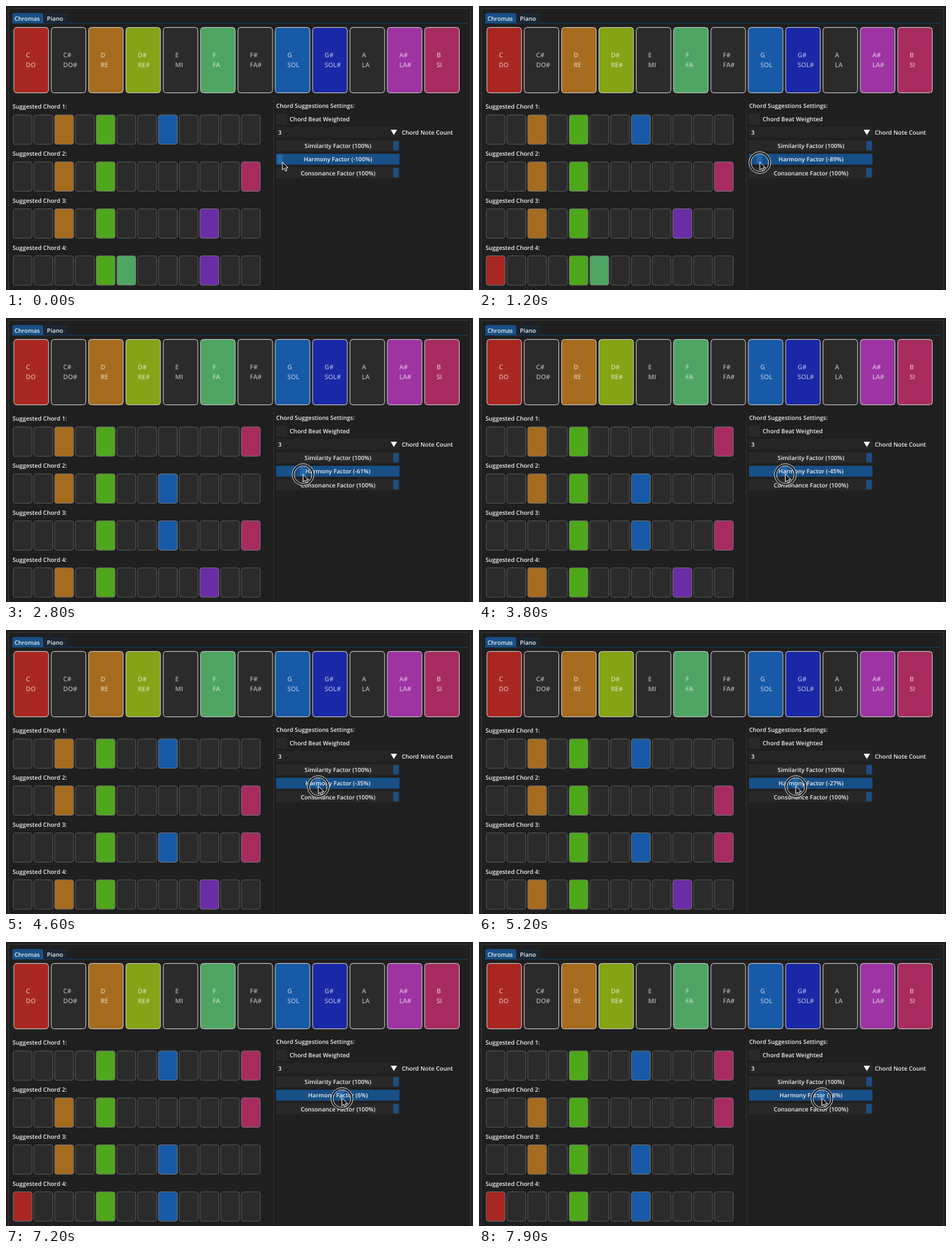
Animation, 664 px wide and 404 px high, one loop 8000 ms. Source, as an HTML page:

```html
<!DOCTYPE html>
<html lang="en">
<head>
<meta charset="utf-8">
<title>Chord suggestions</title>
<style>
html, body { margin: 0; width: 100%; height: 100%; overflow: hidden; background: #1f1f1f; }
svg { display: block; width: 664px; height: 404px; }
text {
  font: 600 8.4px "Open Sans", "Noto Sans", sans-serif;
  fill: #f0f0f0; white-space: pre; text-rendering: geometricPrecision;
}
.note { font-size: 9.2px; fill: #fff; fill-opacity: .62; }
.mid { text-anchor: middle; }
</style>
</head>
<body>
<svg id="stage" viewBox="0 0 664 404"></svg>
<script>
const LOOP = 8000, STEP = 100, PRESS = 300;
const DARK = '#2b2b2b';
const stage = document.getElementById('stage');

function add(tag, attrs, text) {
  const el = document.createElementNS('http://www.w3.org/2000/svg', tag);
  for (const k in attrs) el.setAttribute(k, attrs[k]);
  if (text) el.textContent = text;
  stage.append(el);
  return el;
}
const box = (x, y, width, height, fill, more) => add('rect', { x, y, width, height, fill, ...more });
const line = (d, stroke) => add('path', { d, stroke, fill: 'none' });
const label = (x, y, text, cls = '') => add('text', { x, y, class: cls }, text);

// window frame and tabs
function tab(x, width, fill, text) {
  add('path', { d: `M${x} 24.5v-11.5q0 -3 3 -3h${width - 6}q3 0 3 3v11.5Z`, fill });
  label(x + 3, 20.7, text);
}
line('M3.5 404V3.5H660.5V404', '#363636');
line('M380.5 134V404', '#303030');
line('M8 24.5H656', '#173f68');
tab(9, 44, '#174f87', 'Chromas');
tab(55.3, 31, '#1a2733', 'Piano');

// note keys
const names = ['C', 'C#', 'D', 'D#', 'E', 'F', 'F#', 'G', 'G#', 'A', 'A#', 'B'];
const solfa = { C: 'DO', D: 'RE', E: 'MI', F: 'FA', G: 'SOL', A: 'LA', B: 'SI' };
const colors = {
  C: '#a82722', D: '#a66b1e', 'D#': '#84a316', E: '#4fa71b', F: '#4ea562', G: '#175aa8',
  'G#': '#1a27a6', A: '#6a2da6', 'A#': '#9d34a2', B: '#a82b60'
};
const silent = ['E', 'A'];

names.forEach((name, i) => {
  const x = 11.2 + i * 53.1;
  const fill = silent.includes(name) ? DARK : colors[name] || DARK;
  box(x, 30.5, 49.2, 93, fill, { rx: 4, stroke: '#c4c4c4' });
  label(x + 17, 73, name, 'note');
  label(x + 17, 86.5, solfa[name[0]] + name.slice(1), 'note');
});

// suggested chords
const cells = [0, 1, 2, 3].map(r => {
  const y = 155 + r * 66.8;
  label(9.2, y - 8.6, `Suggested Chord ${r + 1}:`);
  return names.map((_, i) =>
    box(10.3 + i * 29.5, y, 26.7, 41.7, DARK, { rx: 3, 'stroke-width': .9 }));
});

// settings
label(384, 144.7, 'Chord Suggestions Settings:');
box(384, 153, 16, 15.5, '#292929');
label(403.3, 164, 'Chord Beat Weighted');
box(384, 172, 175.5, 15.5, '#262626');
label(387, 183.3, '3');
add('path', { d: 'M547 176H556L551.5 183.5Z', fill: '#fff' });
label(562.7, 183.3, 'Chord Note Count');

function slider(row, fill, grab, text) {
  const y = 191 + row * 19.2;
  box(384, y, 175.5, 15.6, fill);
  const knob = box(550.5, y + 1.2, 8, 13.2, grab);
  return { knob, text: label(472, y + 11.2, text, 'mid') };
}
slider(0, '#282828', '#1b4f83', 'Similarity Factor (100%)');
const harmony = slider(1, '#174f87', '#2767a8', '');
slider(2, '#282828', '#1b4f83', 'Consonance Factor (100%)');

// pointer with press ring
const circle = (r, stroke, width) => add('circle', { r, stroke, 'stroke-width': width, fill: 'none' });
const ring = [circle(14, '#15181c', 3), circle(15.6, '#e4e4e4', .9), circle(12.6, '#e4e4e4', .9)];
const pointer = add('path', {
  d: 'M0 0V11.2L2.6 8.9L4.4 12.9L6.4 12L4.6 8.1H8.1Z',
  fill: '#111', stroke: '#fff', 'stroke-width': .9
});

// key points of the drag: [time, percent]
const drag = [[0, -100], [500, -100], [1200, -89], [2800, -61], [3800, -45], [5200, -27], [6500, -6], [7900, 18]];
// the four chords from each time on
const chords = [
  [0, 'DEG DEB DEA EFA'],
  [900, 'DEG DEB DEA CEF'],
  [2000, 'DEB DEG EGB DEA'],
  [4500, 'DEG DEB EGB DEA'],
  [5900, 'DEB DEG EGB DEA'],
  [6900, 'EGB DEB DEG CEG']
];

function percent(t) {
  const i = Math.max(1, drag.findIndex(([end]) => end >= t));
  const [t0, v0] = drag[i - 1], [t1, v1] = drag[i];
  return v0 + (v1 - v0) * (t - t0) / (t1 - t0);
}

function draw(t) {
  const v = percent(t);
  const grabX = 472 + .825 * v;
  const tipX = Math.max(393, grabX + .7);
  harmony.knob.setAttribute('x', grabX - 4);
  harmony.text.textContent = `Harmony Factor (${Math.round(v)}%)`;
  pointer.setAttribute('transform', `translate(${tipX} 222)`);
  for (const c of ring) {
    c.setAttribute('transform', `translate(${tipX} 222.8)`);
    c.setAttribute('visibility', t < PRESS ? 'hidden' : 'visible');
  }
  const rows = chords.filter(([start]) => start <= t).pop()[1].split(' ');
  cells.forEach((row, r) => row.forEach((cell, i) => {
    const on = rows[r].includes(names[i]);
    cell.setAttribute('fill', on ? colors[names[i]] : DARK);
    cell.setAttribute('stroke', on ? '#787878' : '#5a5a5a');
  }));
}

const begin = performance.now();
function tick() {
  const t = Math.max(0, performance.now() - begin) % LOOP;
  draw(Math.floor(t / STEP) * STEP);
  requestAnimationFrame(tick);
}
draw(0);
requestAnimationFrame(tick);
</script>
</body>
</html>
```
